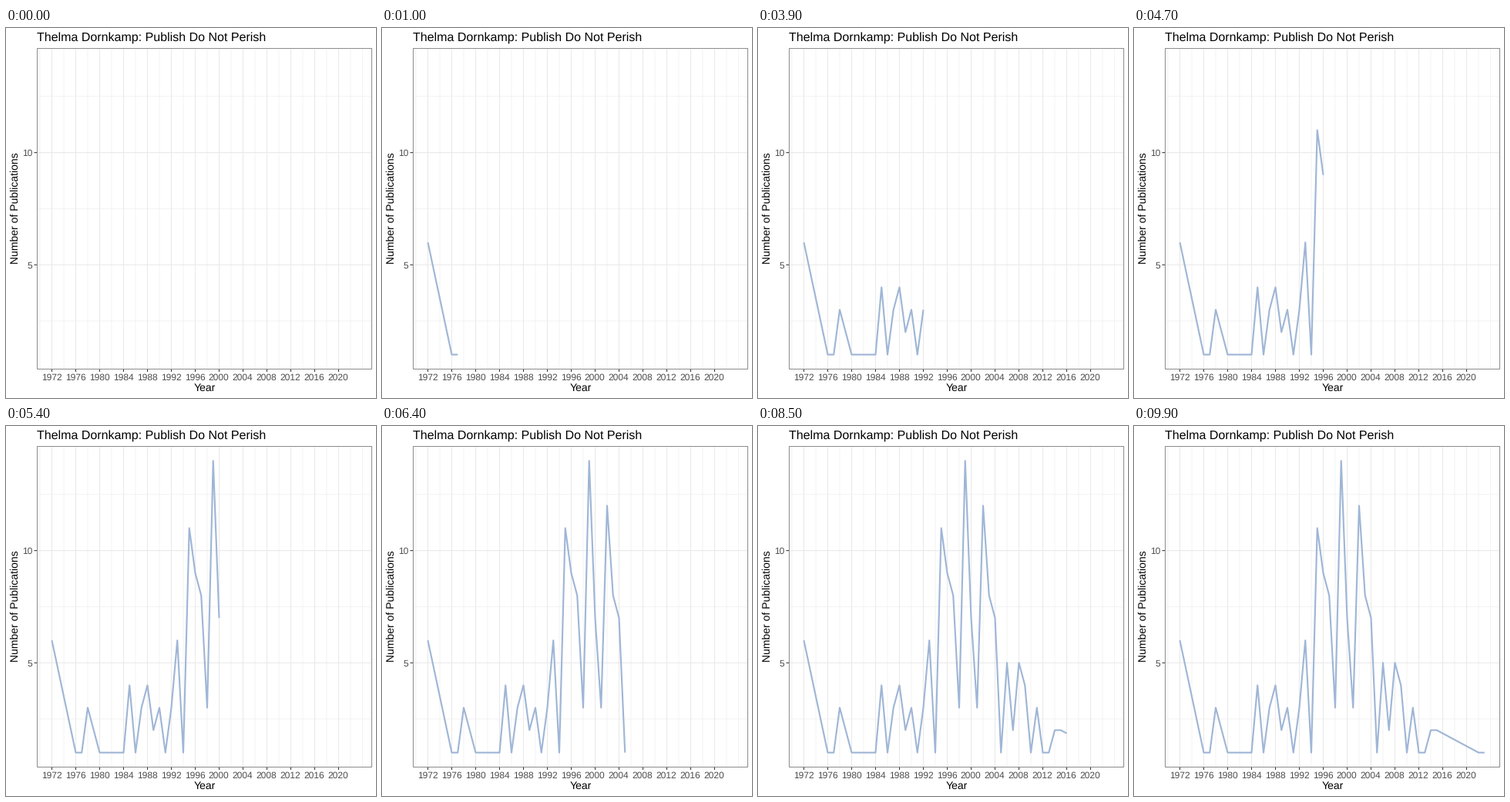
A matplotlib script for the animation above (10000 ms loop, 480 px wide and 480 px high).

```python
import numpy as np
import matplotlib.pyplot as plt
from matplotlib.animation import FuncAnimation
from matplotlib.patches import Rectangle

SIZE, DPI = 480, 96
FRAMES, INTERVAL = 100, 100
PT = 72 / DPI  # points per pixel
GRID, LINE, DARK = "#e9e9e9", "#9fb6d6", "#333333"

plt.rcParams.update({"font.family": "Liberation Sans", "text.hinting": "none"})

COUNTS = {1972: 6, 1976: 1, 1977: 1, 1978: 3, 1980: 1}
COUNTS.update(zip(range(1983, 2016), [
    1, 1, 4, 1, 3, 4, 2, 3, 1, 3, 6, 1, 11, 9, 8, 3, 14,
    7, 3, 12, 8, 7, 1, 5, 2, 5, 4, 1, 3, 1, 1, 2, 2]))
COUNTS.update({2022: 1, 2023: 1})

years = np.array(list(COUNTS))
counts = np.array(list(COUNTS.values()))
# Each year is reached on a whole animation step.
steps = np.round((FRAMES - 1) * (years - 1972) / 51)


def px(year):
    return 59.5 + 7.75 * (year - 1972)


def py(count):
    return 423.7 - 29.12 * (count - 1)


LEFT, RIGHT, TOP, BOTTOM = 40.5, 474.5, 26.5, 442.5

fig = plt.figure(figsize=(SIZE / DPI, SIZE / DPI), dpi=DPI, facecolor="white")
ax = fig.add_axes([0, 0, 1, 1])
ax.set_xlim(0, SIZE)
ax.set_ylim(SIZE, 0)
ax.axis("off")


def rule(xs, ys, color, width):
    ax.plot(xs, ys, color=color, lw=width * PT, snap=False, zorder=1,
            solid_capstyle="butt")


def label(x, y, text, size, color="black", ha="center", **kw):
    ax.text(x, y, text, fontsize=size * PT, color=color, ha=ha,
            va="baseline", **kw)


# Grid
for year in range(1970, 2025, 2):
    major = year % 4 == 0 and year <= 2020
    rule([px(year)] * 2, [TOP, BOTTOM], GRID, 1.07 if major else 0.53)
for count in (2.5, 5, 7.5, 10, 12.5):
    rule([LEFT, RIGHT], [py(count)] * 2, GRID, 1.07 if count % 5 == 0 else 0.53)

# Ticks and labels
for year in range(1972, 2021, 4):
    rule([px(year)] * 2, [BOTTOM, 446], DARK, 1.07)
    label(px(year) - 0.5, 457.3, str(year), 12, "#4d4d4d")
for count in (5, 10):
    rule([36.5, LEFT], [py(count)] * 2, DARK, 1.07)
    label(34.5, py(count) + 4.2, str(count), 12, "#4d4d4d", ha="right")

label(39.7, 16.3, "Thelma Dornkamp: Publish Do Not Perish", 16, ha="left")
label(257.6, 471.2, "Year", 14)
label(16, 233.6, "Number of Publications", 14, rotation=90,
      rotation_mode="anchor")

ax.add_patch(Rectangle((LEFT, TOP), RIGHT - LEFT, BOTTOM - TOP, fill=False,
                       ec="#8c8c8c", lw=PT, snap=False, zorder=4))

path, = ax.plot([], [], color=LINE, lw=2.13 * PT, zorder=3, snap=False,
                solid_capstyle="butt", solid_joinstyle="round")


def update(i):
    if i == 0:
        path.set_data([], [])
        return path,
    past = steps < i
    xs = np.append(years[past], np.interp(i, steps, years))
    ys = np.append(counts[past], np.interp(i, steps, counts))
    path.set_data(px(xs), py(ys))
    return path,


anim = FuncAnimation(fig, update, frames=FRAMES, interval=INTERVAL,
                     repeat=True, repeat_delay=0)
plt.show()
```
